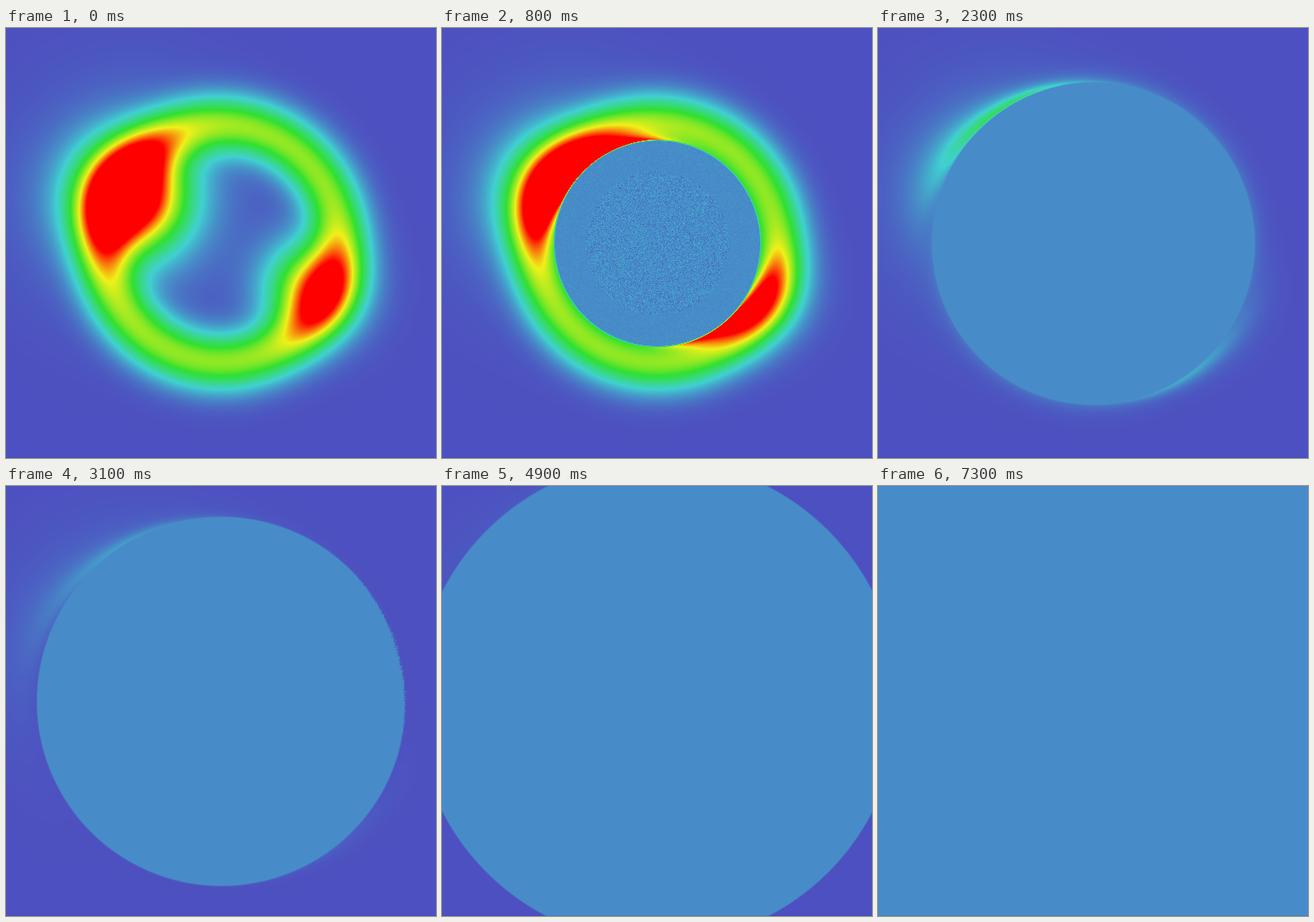
Write a matplotlib script that moves like this. It is 512 px wide and 512 px high and loops after 7.59 s.

```python
import numpy as np
import matplotlib.pyplot as plt
from matplotlib.animation import FuncAnimation
from matplotlib.colors import LinearSegmentedColormap

SIZE = 512
STEP = 30            # ms per drawn frame
FRAMES = 253         # 7590 ms in all
HOLD = 100           # ms per state
LAST = 73
FLAT = 0.118         # value of the fully mixed disc

ramp = LinearSegmentedColormap.from_list("heat", [
    (0.00, (77 / 255, 80 / 255, 192 / 255)),
    (0.25, (64 / 255, 208 / 255, 208 / 255)),
    (0.50, (48 / 255, 224 / 255, 48 / 255)),
    (0.75, (240 / 255, 240 / 255, 24 / 255)),
    (1.00, (1, 0, 0)),
], N=1024)

ys, xs = np.mgrid[0:SIZE, 0:SIZE].astype(float)
xs -= 256
ys -= 256
rad = np.hypot(xs, ys)
ang = np.arctan2(ys, xs)


def blob(x, y, dist, turn, amp, width):
    cx = dist * np.cos(np.radians(turn))
    cy = dist * np.sin(np.radians(turn))
    return amp * np.exp(-((x - cx) ** 2 + (y - cy) ** 2) / (2 * width ** 2))


def field(r, a):
    x, y = r * np.cos(a), r * np.sin(a)
    ring = 0.62 * np.exp(-((r - 141) / 24.5) ** 2 / 2)
    return (ring
            + blob(x, y, 121, 207, 1.12, 45.5)
            + blob(x, y, 121, 207, 0.10, 85)
            + blob(x, y, 120, 26, 0.69, 39))


def reach(n):
    """Radius of the mixed disc; its square grows almost linearly."""
    steps = [0, 8, 16, 24, 32, 40, 57, 72, 73]
    radii = [0, 124, 165, 197, 224, 256, 315, 360.5, 364]
    return np.sqrt(np.interp(n, steps, np.square(radii)))


def state(n):
    if n == 0:
        return field(rad, ang)
    rng = np.random.default_rng(n)
    edge = reach(n) * np.ones_like(rad)
    if 25 <= n <= 38:
        # ragged right-hand rim
        side = np.exp(-((ang + 0.25) / 0.4) ** 2)
        edge -= side * (2 + rng.uniform(-2, 2, rad.shape))
    twist = 0.5 * np.exp(np.clip((edge - rad) / 12, -30, 4))
    value = field(rad, ang - twist)

    soft = 2 + 3 * max(0, 8 - n)
    keep = np.clip((rad - edge + soft) / soft, 0, 1)
    grain = min(0.12, 0.035 * 2 ** ((8 - n) / 2)) if n < 16 else 0
    core = np.where(rad < 0.69 * edge, 1, 0.3)
    noise = rng.standard_normal(rad.shape) * grain * core
    return keep * value + (1 - keep) * (FLAT + noise)


def picture(n):
    rgb = ramp(np.clip(state(n), 0, 1))[..., :3]
    rgb[-1] *= 0.95
    return (rgb * 255 + 0.5).astype(np.uint8)


pictures = [picture(n) for n in range(LAST + 1)]

fig = plt.figure(figsize=(SIZE / 100, SIZE / 100), dpi=100)
ax = fig.add_axes([0, 0, 1, 1])
ax.axis("off")
image = ax.imshow(pictures[0], interpolation="nearest", aspect="auto")


def draw(i):
    n = min(LAST, (i * STEP + STEP - 1) // HOLD)
    image.set_data(pictures[n])
    return (image,)


anim = FuncAnimation(fig, draw, frames=FRAMES, interval=STEP,
                     repeat=True, repeat_delay=0, blit=False)
plt.show()
```
